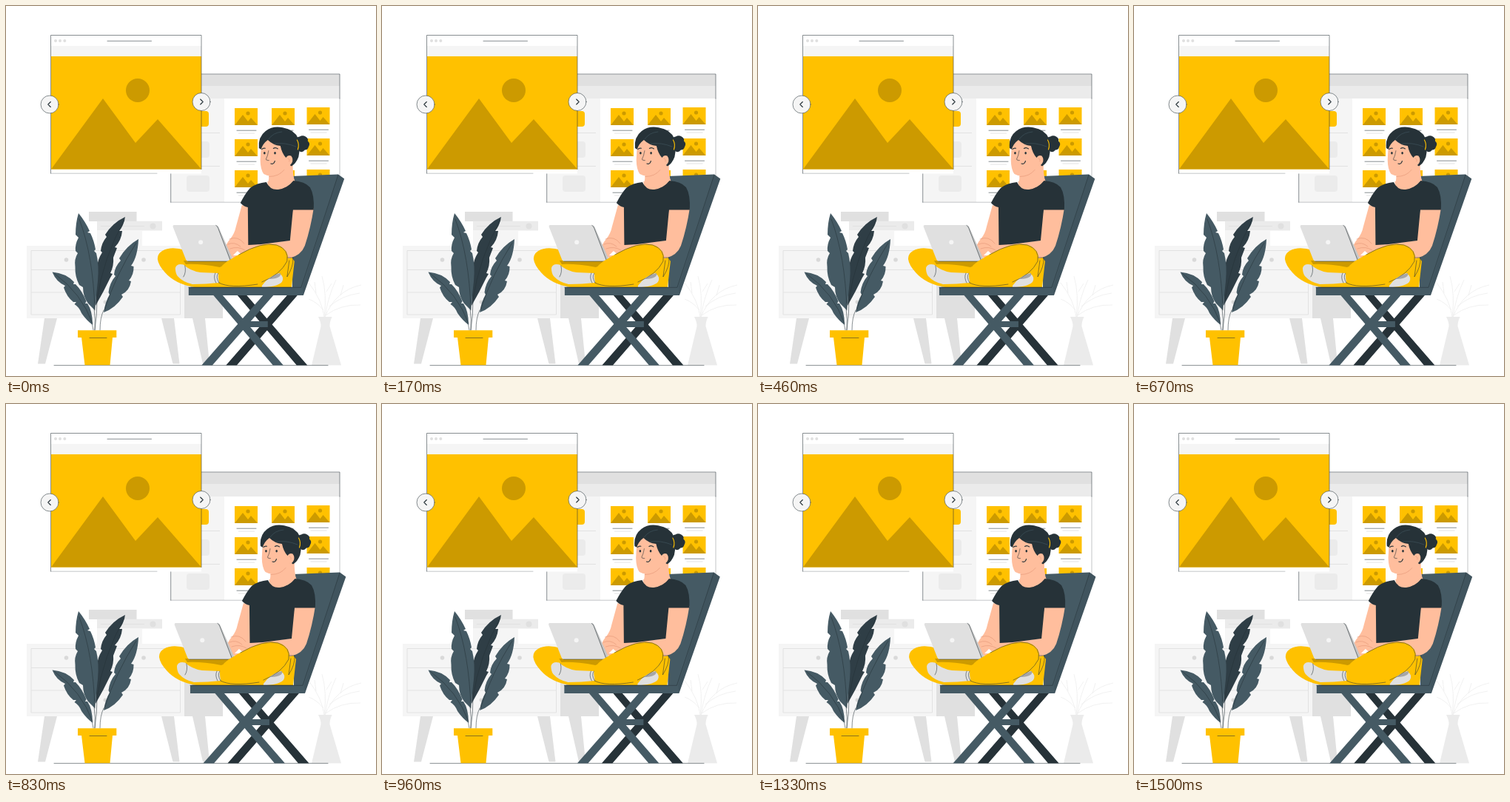
Write an HTML page that moves like this. It is 500 by 500 pixels and loops after 1540 ms.

```html
<!DOCTYPE html>
<html lang="en">
<head>
<meta charset="utf-8">
<title>Browsing pictures</title>
<style>
  html, body { margin: 0; width: 100%; height: 100%; overflow: hidden; background: #fff; }
  svg { display: block; width: 100vw; height: 100vh; }
  .ink { fill: #263238; }
  .slate { fill: #455a64; }
  .deep { fill: #2f3e46; }
  .sun { fill: #ffc100; }
  .shade { fill: #cc9a00; }
  .skin { fill: #ffbe9d; }
  .g1 { fill: #f5f5f5; }
  .g2 { fill: #ebebeb; }
  .g3 { fill: #e0e0e0; }
  .line { fill: none; stroke: #263238; stroke-width: .55; stroke-linecap: round; stroke-linejoin: round; }
  .bold { stroke-width: 1.1; }
  .faint { stroke-opacity: .5; }
  .warm { stroke: #e09272; }
  .strand { stroke: #455a64; }
  .tie { stroke: #ffc100; stroke-width: 1.1; }
  .knob { fill: #f5f5f5; }
  .pale { fill: none; stroke: #e0e0e0; stroke-width: .9; }
  .twig { fill: none; stroke: #ebebeb; stroke-width: .7; }
</style>
</head>
<body>
<svg viewBox="0 0 500 500">
  <defs>
    <g id="thumb">
      <path class="sun" d="M0 0h31v23H0z"/>
      <path class="shade" d="M0 23 11 9l7 9 4-5 9 10z"/>
      <circle class="shade" cx="18" cy="7" r="2.600"/>
      <path class="line" d="M3 30.200h26"/>
      <path class="pale" d="M5 34h22"/>
    </g>
  </defs>

  <!-- gallery window -->
  <g>
    <path fill="#fff" d="M222.500 92H451v173.300H222.500z"/>
    <path class="g3" d="M223 92.500h228V108H223z"/>
    <path class="g2" d="M223 108h228v17H223z"/>
    <path class="g1" d="M223 125h72v140h-72z"/>
    <path class="pale" d="M234 171.500h55M234 216.500h55"/>
    <rect class="sun" x="244" y="142" width="30" height="21" rx="4"/>
    <rect class="g2" x="244" y="183" width="31" height="22" rx="4"/>
    <rect class="g2" x="244" y="229" width="31" height="22" rx="4"/>
    <g id="thumbs"></g>
    <path class="line" d="M222.700 226v39.200M264 92h187v33"/>
    <path class="line faint" d="M451 125v105M222.700 265.200h192"/>
  </g>

  <!-- picture window -->
  <g>
    <path fill="#fff" d="M60.500 39.500H264V226.500H60.500z"/>
    <path class="g1" d="M61 54h203v14H61z"/>
    <g class="g3"><circle cx="67" cy="47" r="2"/><circle cx="73" cy="47" r="2"/><circle cx="79.300" cy="47" r="2"/></g>
    <path class="sun" d="M61 68h203v152.500H61z"/>
    <path class="shade" d="M61 220.500 131 125l44 60 30-32 59 67.500z"/>
    <circle class="shade" cx="178" cy="114" r="16"/>
    <path class="line" d="M137 47.300h59.500M60.500 226V39.500H264V220.500"/>
    <path class="line faint" d="M60.500 226.200H204"/>
    <g class="line">
      <circle class="knob" cx="59" cy="133" r="12"/>
      <circle class="knob" cx="264" cy="129.500" r="12"/>
      <path class="bold" d="m60.300 129.500-3.500 3.500 3.500 3.500M262.700 126l3.500 3.500-3.500 3.500"/>
    </g>
  </g>

  <!-- sideboard -->
  <g>
    <path class="g3" d="M52 422h17l-16 61.500H43zM210 422h17l7.500 61.500h-9zM252 422h17l6 61.500h-9zM112 278h64.500v13H112z"/>
    <path class="g2" d="M123 290.800h88v12.700h-88z"/>
    <path class="g1" d="M123 303.500h61V324h-61z"/>
    <path class="pale" d="M128 297.500h59"/>
    <circle class="g3" cx="198.500" cy="297.500" r="4"/>
    <path class="g1" d="M28 324h213v98H28z"/>
    <path class="g3" d="M241 324h52v98h-52z"/>
    <path class="pale" d="M34 330.500h201.500v86.500H34zM34 356.500h201.500M34 387h201.500"/>
    <g fill="#d9d9d9"><circle cx="81.500" cy="343" r="2.800"/><circle cx="186" cy="343" r="2.800"/><circle cx="134" cy="400" r="2.500"/></g>
  </g>

  <!-- vase -->
  <g>
    <path class="g2" d="M422 420h18.500Q437 428 437.500 433L453 485.500h-40L425.500 433Q426 428 422 420z"/>
    <path class="twig" d="M430 420Q427 397 409 374M429 411Q420 400 409 396M430 420Q434 390 427 365M431 420Q435 393 446 370M431 420Q446 384 480 377M437 406Q454 391 478 388M432 418Q452 403 479 404M419 388l-2-15M433 386l7-11M452 391l4-14"/>
  </g>

  <path class="line" d="M65 485.600h370"/>

  <!-- plant -->
  <g>
    <path class="line" d="M119 408q2 15 1 30M123 398q0 20-3 40M132 411q-5 10-5 27M116 428l2 10"/>
    <path class="deep" d="M161 285Q144 293 134 309L136 312Q129 320 128 331L130 333Q124 342 123 353L121 405Q132 386 141 367L144 362 141 361Q146 351 145 340L150 327 147 326Q156 317 157 304L153 304Q159 297 161 285z"/>
    <path class="slate" d="M98 280Q94 293 94 309L98 313Q93 322 94 331L97 334Q92 342 93.500 352Q93 366 99 377L104 380Q104 393 111 402L120 411Q122 390 124 372Q126 350 122 334L119 331 121 329Q119 317 114 307L110 306 113 304Q107 291 98 280z"/>
    <path class="slate" d="M179 315Q163 324 153 341L155 344Q147 352 146 363L148 365Q140 374 138.500 387L140 390Q134 400 132 414Q147 409 158 393L156 390Q167 385 169 372L166 371Q173 363 172.500 352L169 351Q178 339 179 315z"/>
    <path class="slate" d="M62.500 359.500Q68 373 80 378L78 380.500Q82 393 91 400L95 400 92.500 403Q99 407 102 415Q108 424 117 431Q117 412 110 402L107 402 108.500 399Q103 385 94 376L91 376 92 373Q81 361 62.500 359.500z"/>
    <path class="line" d="M99 288q19 50 21 123M160 289q-29 52-37 108M176 320q-28 44-43 91M66 362q36 26 51 67"/>
    <path class="sun" d="M97 438.200h52.300V448H97zM102 448h42L140.500 485.300H106.500z"/>
    <path class="line" d="M113 448.500h23"/>
  </g>

  <!-- reader and chair -->
  <g id="rocker">
    <path class="ink" d="M380 391h14l-82 94.500h-14.500zM313 391h12.500l82 94.500H393z"/>
    <path class="slate" d="M280.500 391H293l82 94.500h-14z"/>
    <path class="slate" d="M317 426h37v8h-37z"/>
    <path class="slate" d="M347.500 391h14L279 485.500h-14.500z"/>
    <path class="slate" d="M386 230 449 227.500 457.300 233.500 402 391H247v-11h140z"/>
    <path fill="#37474f" d="m449 227.500 8.300 6L402 391l-1-11z" opacity=".3"/>
    <path class="line" d="M247 380.300h152l50-152"/>

    <!-- neck and head -->
    <path class="skin" d="M355 222 388 210Q387 228 391 238L374 249H349Q356 240 355.500 229z"/>
    <path class="ink" d="M393 181q-1-4 4-4.500 4-2.500 8 0 4 2 3 6 4 3 1 8-1 4-5 4-3 4-7 2-4-3-2-8-3-3-2-7.500z"/>
    <path class="ink" d="M342 192Q340.500 177 351 169 361 161.500 374 164.300 390 167 395 179 398.500 190 395.500 204 392 213 386 216.500L374 208 350 197z"/>
    <path class="skin" d="M344.500 194.500Q347 186 354 181 361 188 371 189 373 199 378.500 205 381 200.500 385.500 202.500 389 207 386.500 212 383.500 217 379.500 215.500 375 225 366 228.500 356 231.500 348.500 227 344 221 343.800 208z"/>
    <path class="line warm" d="M356 230.500q13 0 20-9M381 206q3 0 2 4"/>
    <path class="line strand" d="M355 180q6-9 18-10M363 186q14-2 29 4"/>
    <path class="line tie" d="M393.500 181q3.500 6 1 13"/>
    <g class="line">
      <path class="bold" d="M346 193.500q2-2 4.500-1.200M361.500 192.500q3-2 6 .5"/>
      <path class="faint bold" d="M355 195.500q-1 7-3.500 11.500 1 2 4 1.500"/>
      <path class="bold" d="M358 213q4 1.500 5.500-3.500"/>
    </g>
    <g class="ink"><ellipse cx="349.500" cy="198.700" rx="1.300" ry="1.700"/><ellipse cx="363.700" cy="198.700" rx="1.300" ry="1.700"/></g>

    <!-- far leg -->
    <path class="sun" d="M205 342Q205 330 222 327.500 240 326 258 338L305 345 335 330 380 330 390 345 386 380H255Q229 376 215 360 206 350 205 342z"/>
    <path class="shade" d="M240 344 308 345 289 353Q262 348 243 349z"/>

    <!-- arms and shirt -->
    <path class="skin" d="M319 269 331 273 330 314 340 321 332 331 307 341 297 330Q296 323 303 315 309 308 311 298z"/>
    <path class="skin" d="M388 273 416 273Q412 300 404 324 399 337 383 341L340 338 315 333Q303 333 302 328 309 321 325 324L382 317z"/>
    <path class="ink" d="M352 238Q339 239 330 246 323 254 317 266 321 271 327 272L327.500 323 345 322 384 317 388 275.500H416Q417 255 411 245 404 237 388 236 381 246 368 248 357 249 352 238z"/>
    <path class="skin" d="M353 237.500Q356 247 367 247.500 381 246 389 235.500L380 232z"/>
    <path class="line warm" d="M302 315q12-5 20 6M300 322q9-4 17 3M303 328q11-4 20 2"/>
    <path fill="#fff" d="m313 331-6 6h13z"/>

    <!-- laptop -->
    <path fill="#c7c7c7" d="M283 296q3.500 0 4.500 3l20.500 46h-7z"/>
    <path class="g3" d="M227.500 296h55q2.500 0 3.500 3l17 46h-57q-2 0-3-3l-17-43q-1-3 1.500-3z"/>
    <path class="line" d="M284 296.500q2 1 3 4l17 44.500h-58"/>
    <circle class="g1" cx="263.300" cy="319.300" r="3"/>

    <!-- near leg and feet -->
    <path class="g3" d="M229 354Q231 347.500 240 349.500 249 358 263 360L287 361 288 374Q270 376 252 376 239 373 232 365 229 361 229 354z"/>
    <path class="line" d="M287 361q-4 5 1 13M283 361q-3 6 1 13M242 351q2 9-2 15"/>
    <path class="sun" d="M287.500 360Q290 349 306 341 332 325 350 322 371 319 379 332 386 347 372 359 359 371 337 376 306 381 291 376 286 370 287.500 360z"/>
    <path class="g3" d="M346 378Q354 366 369 361 377 366 373 373 366 380 346 380z"/>
    <path fill="#a6a6a6" d="M356 369q8-7 15-8 2 7-15 8z"/>
    <path class="line" d="M315 336q31-18 51-13 17 6 14 22-9 18-34 28M381 340h7q1 12-8 26l3-22M288 374q14 8 52 2"/>
    <path class="line" d="M250 380h136"/>
  </g>
</svg>
<script>
  const thumbs = document.getElementById('thumbs');
  const rocker = document.getElementById('rocker');

  for (const y of [138, 180, 222])
    for (const x of [309, 359, 406.5]) {
      const use = document.createElementNS('http://www.w3.org/2000/svg', 'use');
      use.setAttribute('href', '#thumb');
      use.setAttribute('x', x);
      use.setAttribute('y', x > 400 ? y - 1 : y);
      thumbs.append(use);
    }

  // horizontal shake: one stop per tenth of the 1.5 s cycle
  const stops = [0, -1, 2, -4, 4, -4, 4, -4, 2, -1, 0];
  const loop = 1540, fps = 24, cycle = 36, lead = 0.019;

  function shake(t) {
    const step = Math.floor((t % loop + 5) * fps / 1000) % 37;
    const p = (step / cycle + lead) % 1 * 10;
    const i = Math.floor(p);
    return stops[i] + (stops[i + 1] - stops[i]) * (p - i);
  }

  function draw() {
    rocker.setAttribute('transform', `translate(${shake(performance.now()).toFixed(2)} 0)`);
    requestAnimationFrame(draw);
  }
  draw();
</script>
</body>
</html>
```
